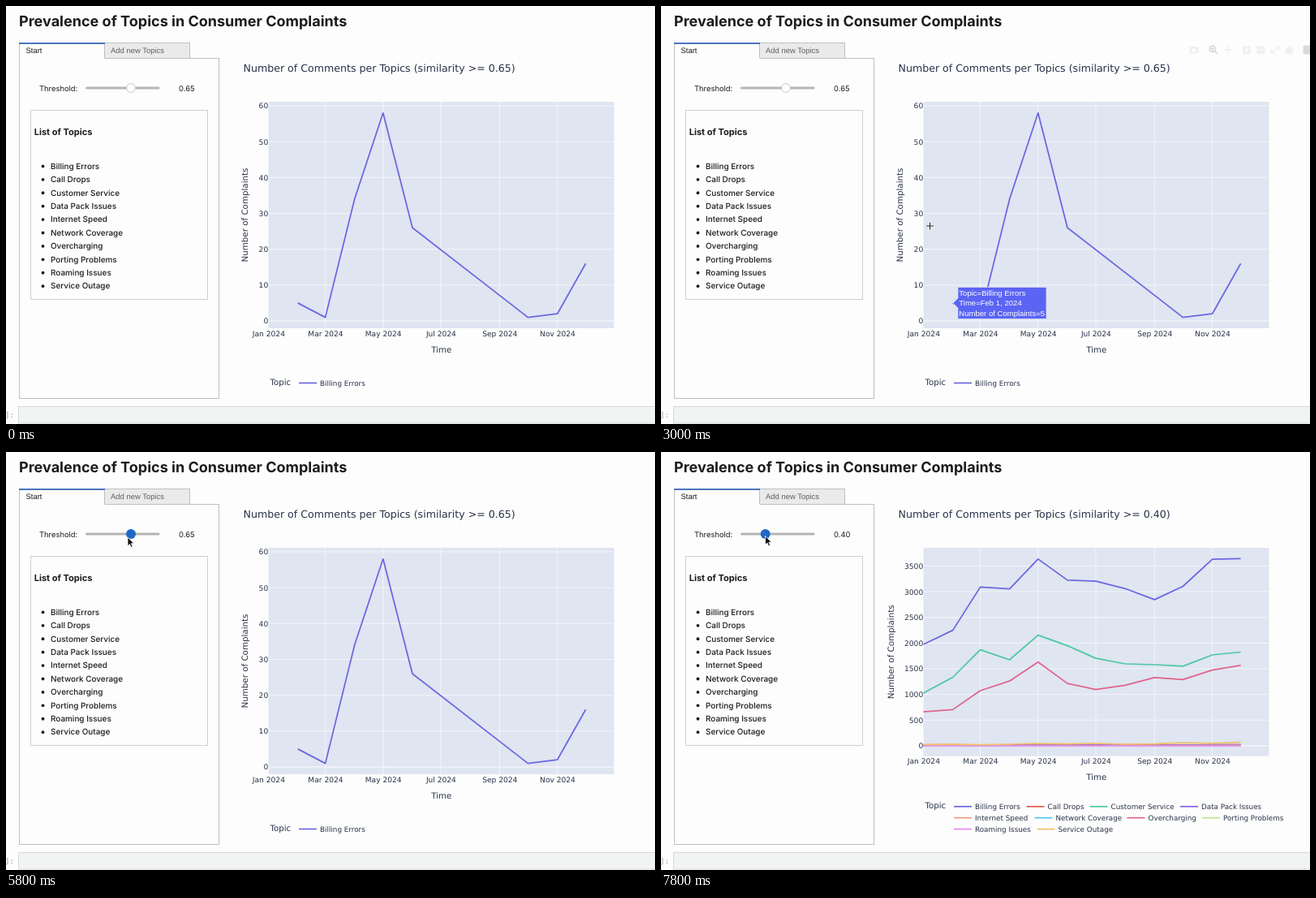
An HTML page that plays this animation: 800x515 px, repeating every 8 s.

```html
<!DOCTYPE html>
<html lang="en">
<head>
<meta charset="utf-8">
<title>Prevalence of Topics</title>
<style>
  html, body { margin: 0; width: 100%; height: 100%; overflow: hidden; background: #fdfdfd; }
  svg { display: block; width: 800px; height: 515px; }
  .ui { font-family: Inter, sans-serif; fill: #1c1c1c; text-rendering: geometricPrecision; }
  .tab { font: 9.45px "Liberation Sans", sans-serif; }
  .plot { font-family: "DejaVu Sans", sans-serif; fill: #293248; text-rendering: geometricPrecision; }
  .tip { font: 9.55px "Liberation Sans", sans-serif; fill: #fff; }
</style>
</head>
<body>
<svg id="stage" viewBox="0 0 800 515"></svg>
<script>
const LOOP = 8000, STEP = 200;
const TOPICS = [
  ['Billing Errors', '#6b67e0'], ['Call Drops', '#de5c50'],
  ['Customer Service', '#4bc8a2'], ['Data Pack Issues', '#8a60de'],
  ['Internet Speed', '#f09c78'], ['Network Coverage', '#50c6ee'],
  ['Overcharging', '#e0648c'], ['Porting Problems', '#c6df98'],
  ['Roaming Issues', '#e98af0'], ['Service Outage', '#efc266'],
];
const stage = document.getElementById('stage');

function add(parent, tag, attrs = {}, text) {
  const node = document.createElementNS('http://www.w3.org/2000/svg', tag);
  for (const key in attrs) node.setAttribute(key, attrs[key]);
  if (text !== undefined) node.textContent = text;
  parent.appendChild(node);
  return node;
}
const label = (parent, text, x, y, size, extra) =>
  add(parent, 'text', { x, y, 'font-size': size, ...extra }, text);
const box = (parent, x, y, width, height, extra) =>
  add(parent, 'rect', { x, y, width, height, ...extra });
const line = (parent, d, stroke, width = 1) =>
  add(parent, 'path', { d, stroke, 'stroke-width': width, fill: 'none' });
const show = (node, on) => node.setAttribute('visibility', on ? 'visible' : 'hidden');

// Left panel
const ui = add(stage, 'g', { class: 'ui' });
label(ui, 'Prevalence of Topics in Consumer Complaints', 16, 25, 18.04, { 'font-weight': 700 });
box(ui, 16.5, 64.5, 246, 419, { fill: 'none', stroke: '#bebfc0' });
box(ui, 121.5, 45.5, 105, 19, { fill: '#eaeaea', stroke: '#bfbfbf' });
box(ui, 16.5, 45.5, 105, 20, { fill: '#fdfdfd' });
line(ui, 'M16.5 65V46M121.5 64V46', '#bfbfbf');
line(ui, 'M16 46H122', '#4a74bd', 2);
label(ui, 'Start', 24.5, 57.7, 9.45, { class: 'tab' });
label(ui, 'Add new Topics', 129, 57.7, 9.45, { class: 'tab', fill: '#606060' });
label(ui, 'Threshold:', 41, 104.6, 9.4);
const readout = label(ui, '0.65', 213, 104.6, 9.4);
box(ui, 98, 99.4, 91.5, 3, { rx: 1.5, fill: '#b5b5b5' });
const knob = add(ui, 'circle', { cy: 101 });
box(ui, 30.5, 128.5, 218, 233, { fill: 'none', stroke: '#cfcfcf' });
label(ui, 'List of Topics', 34.7, 158.7, 11.05, { 'font-weight': 700 });
TOPICS.forEach(([name], i) => {
  const y = 197.2 + i * 16.42;
  add(ui, 'circle', { cx: 45.5, cy: y + 0.2, r: 1.9 });
  label(ui, name, 55, y + 3.5, 9.95, { 'font-weight': 500 });
});
box(ui, 15.5, 493.5, 800, 20.5, { fill: '#f2f3f3', stroke: '#d6d8d9' });
label(ui, ']:', -1, 506.5, 9, { style: 'font-family:"DejaVu Sans Mono",monospace', fill: '#8b95a0' });

// Charts
const dateX = month =>
  323.5 + (Date.UTC(2024, month, 1) - Date.UTC(2024, 0, 1)) / 864e5 * 1.1675;

function legendKey(parent, topic, x, y) {
  line(parent, `M${x} ${y}h22`, TOPICS[topic][1], 1.7);
  label(parent, TOPICS[topic][0], x + 26, y + 3.3, 8.8);
}

function chart({ threshold, bottom, zero, unit, tick, top, titleX, series, legendY }) {
  const g = add(stage, 'g', { class: 'plot' });
  const mid = (118 + bottom) / 2;
  label(g, `Number of Comments per Topics (similarity >= ${threshold})`, 292.5, 81, 12.6);
  box(g, 323.5, 118, 426, bottom - 118, { fill: '#dfe5f1' });
  for (let month = 0; month < 12; month += 2) {
    const x = dateX(month), name = ['Jan', 'Mar', 'May', 'Jul', 'Sep', 'Nov'][month / 2];
    if (month) line(g, `M${x} 118V${bottom}`, '#f3f6fa');
    label(g, `${name} 2024`, x + 0.4, bottom + 9.7, 9.1, { 'text-anchor': 'middle' });
  }
  for (let v = 0; v <= top; v += tick) {
    const y = zero - v * unit;
    line(g, `M323.5 ${y}H749.5`, '#f3f6fa', v ? 1 : 1.7);
    label(g, v, 323.2, y + 3.4, 9.1, { 'text-anchor': 'end' });
  }
  label(g, 'Time', 536.8, bottom + 29.5, 10.2, { 'text-anchor': 'middle' });
  label(g, 'Number of Complaints', 0, 0, 10.3,
    { 'text-anchor': 'middle', transform: `translate(${titleX} ${mid}) rotate(-90)` });
  for (const [topic, values] of series) {
    const points = values.flatMap((v, i) =>
      v === null ? [] : [`${dateX(i).toFixed(1)},${(zero - v * unit).toFixed(1)}`]);
    add(g, 'polyline', { points: points.join(' '), fill: 'none', stroke: TOPICS[topic][1],
      'stroke-width': 1.75, 'stroke-linejoin': 'round' });
  }
  label(g, 'Topic', 325.5, legendY + 2.9, 10.2);
  return g;
}

const sparse = chart({
  threshold: '0.65', bottom: 397, zero: 388, unit: 4.417, tick: 10, top: 60,
  titleX: 298, legendY: 464.2,
  series: [[0, [null, 5, 1, 34, 58, 26, null, null, null, 1, 2, 16]]],
});
legendKey(sparse, 0, 361, 464.5);

const nearZero = level => Array.from({ length: 12 }, (_, i) => level + level * 0.3 * Math.sin(i * 2));
const full = chart({
  threshold: '0.40', bottom: 374.7, zero: 362, unit: 0.0633, tick: 500, top: 3500,
  titleX: 286.5, legendY: 436.4,
  series: [
    [0, [1975, 2250, 3090, 3055, 3635, 3225, 3205, 3060, 2845, 3105, 3630, 3645]],
    [1, nearZero(18)],
    [2, [1025, 1335, 1870, 1675, 2155, 1950, 1705, 1595, 1580, 1550, 1770, 1825]],
    [3, [5, 8, 5, 10, 28, 20, 26, 14, 12, 16, 22, 24]],
    [4, nearZero(9)],
    [5, nearZero(3)],
    [6, [660, 705, 1075, 1260, 1630, 1215, 1095, 1180, 1330, 1290, 1475, 1565]],
    [7, nearZero(2)],
    [8, nearZero(0)],
    [9, [25, 28, 22, 32, 48, 38, 48, 32, 36, 60, 50, 70]],
  ],
});
[[361, 450.5, 528.5, 640], [361, 460.5, 574.5, 667], [361, 463.5]].forEach((row, r) =>
  row.forEach((x, c) => legendKey(full, r * 4 + c, x, 436.8 + r * 13.9)));

// Hover layer: toolbar and tooltip
const toolbar = add(stage, 'g', { opacity: 0.9 });
box(toolbar, 651.5, 50, 11.5, 8.5, { rx: 1.5, fill: '#eeeff1' });
add(toolbar, 'circle', { cx: 657, cy: 54.3, r: 2.4, fill: '#fdfdfd' });
add(toolbar, 'circle', { cx: 679.8, cy: 52.8, r: 3.6, fill: 'none', stroke: '#cfd2d7', 'stroke-width': 1.7 });
line(toolbar, 'M682.5 55.5L686 59M678 52.8H681.6M679.8 51V54.6', '#cfd2d7', 1.5);
line(toolbar, 'M693.5 54H703.5M698.5 49V59', '#eeeff1', 1.6);
for (const x of [717, 734.5]) box(toolbar, x, 49.5, 10, 9.5, { rx: 1, fill: '#eeeff1' });
line(toolbar, 'M719 54.2H725M722 51.2V57.2M736.5 54.2H742.5', '#fdfdfd', 1.3);
line(toolbar, 'M752 58V53M752 58H757M762 50H757M762 50V55M753 57L761 51', '#eeeff1', 1.5);
add(toolbar, 'path', { d: 'M768.5 54.5L774.5 49L780.5 54.5H779V59H770V54.5Z', fill: '#eeeff1' });
box(toolbar, 791.5, 48.5, 11, 11, { rx: 1.5, fill: '#d5d7db' });

const tooltip = add(stage, 'g', { class: 'tip' });
add(tooltip, 'path', { d: 'M360 366L366 360V346.5H475V385.5H366V372Z',
  fill: '#5b64f3', stroke: '#dfe5f1', 'stroke-width': 0.7 });
['Topic=Billing Errors', 'Time=Feb 1, 2024', 'Number of Complaints=5'].forEach((text, i) =>
  label(tooltip, text, 367.3, 356.8 + i * 12.4, 9.55));

// Pointers
const cross = add(stage, 'g');
line(cross, 'M-5 0H5M0 -5V5', '#fff', 2.2);
line(cross, 'M-4.5 0H4.5M0 -4.5V4.5', '#222', 1.1);
const arrow = add(stage, 'path', { d: 'M0 0V10.8L2.5 8.5L4.2 12.4L6.1 11.6L4.4 7.7H7.8Z',
  fill: '#111', stroke: '#fff', 'stroke-width': 0.8 });

// [time, x, y] of the pointer
const PATH = [
  [2800, 372, 420], [3000, 331.5, 271], [3200, 258, 188], [3400, 187, 132],
  [3600, 157, 108], [3800, 152.3, 104], [4200, 150, 105], [5800, 150, 105],
  [6800, 128.5, 103.5], [LOOP, 128.5, 103.5],
];

function pointerAt(t) {
  const i = PATH.findIndex(p => p[0] > t);
  const [t0, x0, y0] = PATH[i - 1], [t1, x1, y1] = PATH[i];
  const k = (t - t0) / (t1 - t0);
  return [x0 + (x1 - x0) * k, y0 + (y1 - y0) * k];
}

function draw(t) {
  const moving = t >= PATH[0][0];
  const overPlot = t >= 3000 && t < 3200;
  const grabbed = t >= 3600;
  const drag = Math.min(5, Math.max(0, (t - 5800) / STEP));
  const value = 0.65 - drag * 0.05;

  readout.textContent = value.toFixed(2);
  knob.setAttribute('cx', 154 + (value - 0.65) * 101.5);
  knob.setAttribute('r', grabbed ? 6 : 5.4);
  knob.setAttribute('fill', grabbed ? '#1e68c8' : '#fff');
  knob.setAttribute('stroke', grabbed ? 'none' : '#c6c6c6');

  show(sparse, t < 7800);
  show(full, t >= 7800);
  show(toolbar, overPlot);
  show(tooltip, overPlot);
  show(cross, overPlot);
  show(arrow, moving && !overPlot);
  if (moving) {
    const place = `translate(${pointerAt(t)})`;
    cross.setAttribute('transform', place);
    arrow.setAttribute('transform', place);
  }
}

const start = performance.now();
function tick() {
  const t = (performance.now() - start) % LOOP;
  draw(Math.floor(t / STEP) * STEP);
  requestAnimationFrame(tick);
}
tick();
</script>
</body>
</html>
```
